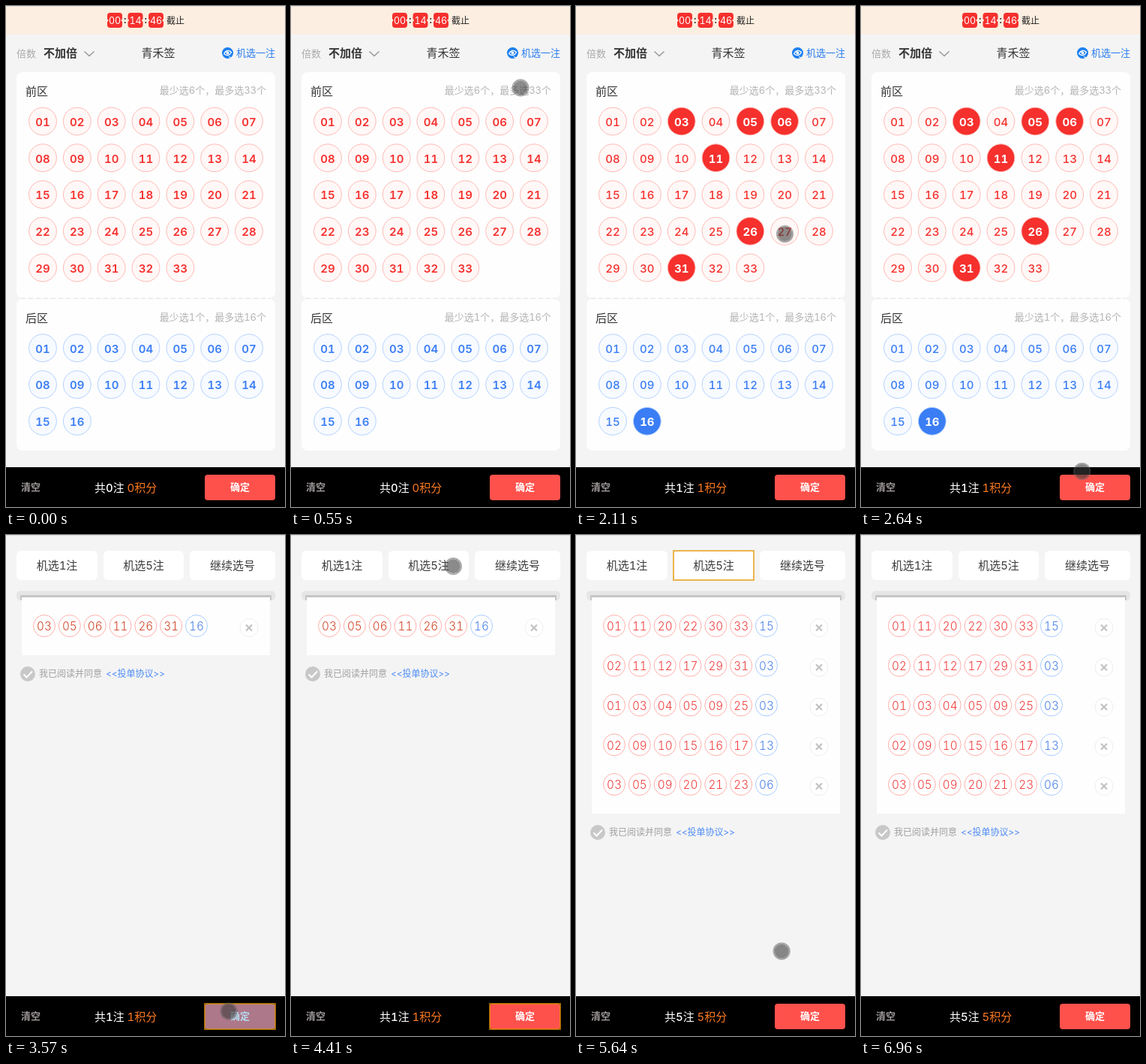
An HTML page for the animation above (7110 ms loop, 372x667 px).

```html
<!DOCTYPE html>
<html lang="zh-CN">
<head>
<meta charset="utf-8">
<style>
html, body { margin: 0; width: 100%; height: 100%; overflow: hidden; background: #f4f4f4; }
svg {
  display: block; width: 100%; height: 100%;
  font-family: Inter, "Noto Sans CJK SC", "Noto Sans CJK", sans-serif;
  font-variant-numeric: tabular-nums;
}
</style>
</head>
<body>
<svg viewBox="0 0 372 667" xmlns="http://www.w3.org/2000/svg">
  <g id="page"></g>
  <g id="cursor">
    <circle id="halo" r="10.6" stroke-width="2"/>
    <circle id="dot" r="9"/>
  </g>
</svg>
<script>
const LOOP = 7110, STEP = 76.7;
const CLICK_PICK = 1480, PICKED = 1630;
const CLICK_OK = 3485, LIST = 3560, TAP_END = 3640;
const CLICK_FIVE = 4870, FIVE = 5020, BLUR = 6960;
const ENTER = 170, LEAVE = 6100;
const RED = '#f5302d', BLUE = '#3a7df5', PAPER = '#fefefe', GREY = '#b4b4b4';

const first = ['03 05 06 11 26 31 16'];
const five = [
  '01 11 20 22 30 33 15',
  '02 11 12 17 29 31 03',
  '01 03 04 05 09 25 03',
  '02 09 10 15 16 17 13',
  '03 05 09 20 21 23 06'
];

const $ = id => document.getElementById(id);
const pad = n => String(n).padStart(2, '0');

function rect(x, y, w, h, fill, r = 0) {
  return `<rect x="${x}" y="${y}" width="${w}" height="${h}" rx="${r}" fill="${fill}"/>`;
}
function circle(x, y, r, fill, stroke = 'none') {
  return `<circle cx="${x}" cy="${y}" r="${r}" fill="${fill}" stroke="${stroke}"/>`;
}
function line(d, stroke, width, dash = 'none') {
  return `<path d="${d}" fill="none" stroke="${stroke}" stroke-width="${width}" stroke-dasharray="${dash}"/>`;
}
function focusRing(x, y, w, h) {
  return line(`M${x} ${y}h${w}v${h}h${-w}z`, 'rgba(229,151,0,.68)', 2);
}
// y is the middle of the glyphs
function text(s, x, y, size, fill, weight = 400, anchor = 'start') {
  const safe = s.replace(/</g, '&lt;').replace(/>/g, '&gt;');
  return `<text x="${x}" y="${y + size * 0.37}" font-size="${size}" fill="${fill}" font-weight="${weight}" text-anchor="${anchor}">${safe}</text>`;
}
const mid = (s, x, y, size, fill, weight) => text(s, x, y, size, fill, weight, 'middle');
const end = (s, x, y, size, fill) => text(s, x, y, size, fill, 400, 'end');

function balls(count, top, chosen, color, pale, edge, weight) {
  let out = '';
  for (let i = 0; i < count; i++) {
    const x = 49 + 45.83 * (i % 7), y = top + 48.75 * Math.floor(i / 7);
    const label = pad(i + 1), on = chosen.includes(label);
    out += circle(x, y, 18.4, on ? color : pale, edge);
    out += mid(label, x, y + 0.8, 15, on ? '#fff' : color, on ? 700 : weight);
  }
  return out;
}

function timer() {
  const back = '#fceee0';
  let out = rect(0, 0, 372, 38, back);
  ['00', '14', '46'].forEach((s, i) => {
    const x = 135 + 27.5 * i;
    out += rect(x, 9, 20, 20, RED, 4);
    out += circle(x, 19, 1.5, back) + circle(x + 20, 19, 1.5, back);
    out += mid(s, x + 10, 19.3, 12.5, '#fff');
    if (i < 2) out += mid(':', x + 23.8, 18.5, 13, '#222', 600);
  });
  return out + text('截止', 214, 19.3, 12, '#222', 500);
}

function randomIcon() {
  return circle(295.5, 62.5, 7.5, '#1a7ff0') +
    line('M290.5 63.5Q295 56.5 300.5 61.5Q297 68.5 290.5 63.5', '#fff', 1.3) +
    circle(295.5, 62.5, 1.9, '#fff') +
    line('M297 67.5L301.5 69.5', '#f4f4f4', 1.3);
}

function card(title, hint, y, h) {
  return rect(14, y, 345, h, PAPER, 8) +
    text(title, 26, y + 25.5, 15, '#333') +
    end(hint, 347, y + 24.5, 13, GREY);
}

function pickPage(picked) {
  const weight = picked ? 500 : 600;
  const chosen = picked ? first[0].split(' ') : [];
  return timer() +
    text('倍数', 14, 63, 13, '#aaa') +
    text('不加倍', 50, 62.5, 15, '#333', 700) +
    line('M104.5 60.5L111 66.5L117.5 60.5', '#999', 1.5) +
    mid('青禾签', 203, 62.5, 15, '#333') +
    randomIcon() +
    end('机选一注', 359, 62, 13, '#2a7df0') +
    card('前区', '最少选6个，最多选33个', 88, 301) +
    card('后区', '最少选1个，最多选16个', 390, 202) +
    line('M20 389.2H353', '#e6e6e6', 1.2, '6 4') +
    balls(33, 153.5, chosen.slice(0, 6), RED, '#fff8f7', '#ffb9b5', weight) +
    balls(16, 455.3, chosen.slice(6), BLUE, '#f7faff', '#b5d2ff', weight);
}

function tab(s, x, w) {
  return rect(x, 21, w, 39, '#fff', 6) + mid(s, x + w / 2, 40.3, 15, '#3c3a3a');
}

function ticket(row, j, ink) {
  const y = 121 + 52.75 * j, ky = y + 2.5;
  const numbers = row.split(' ').map((s, i) => {
    const x = 51 + 33.83 * i, last = i === 6;
    return circle(x, y, 14.5, '#fff', last ? '#a9cbff' : '#ffb0ac') +
      mid(s, x, y + 0.6, 15.3, last ? '#4a80e8' : ink, 300);
  });
  return numbers.join('') + circle(324, ky, 12, '#fff', '#eee') +
    line(`M320 ${ky - 4}l8 8m0 -8l-8 8`, '#c2c2c2', 2.2);
}

function listPage(rows) {
  const many = rows.length > 1;
  const bottom = 107.25 + 52.75 * rows.length, y = bottom + 25;
  return tab('机选1注', 14, 108) + tab('机选5注', 130, 107) + tab('继续选号', 245, 114) +
    rect(14, 74.5, 345, 12.5, '#e6e6e6', 5) +
    rect(19, 80, 335, 7, '#c6c6c6', 1) +
    rect(21, 83, 331, bottom - 83, PAPER) +
    rows.map((row, j) => ticket(row, j, many ? '#f03c3c' : '#d04628')).join('') +
    circle(29, y, 10, '#c8c8c8') +
    line(`M23.5 ${y + 0.5}l4 4l7.5 -8`, '#fff', 2) +
    text('我已阅读并同意', 44, y, 12, '#a0a0a0') +
    text('<<投单协议>>', 133, y, 12, '#4c8bf5');
}

function bar(count, tapped) {
  return rect(0, 614, 372, 53, '#000') +
    text('清空', 20, 640.3, 13, '#a09a9a', 700) +
    text(`共${count}注`, 118, 641.3, 15, '#fff', 500) +
    text(`${count}积分`, 161.5, 641.3, 15, '#ff7a22') +
    rect(265, 624, 94, 34, tapped ? '#ad7889' : '#ff514c', 4) +
    mid('确定', 312, 640.3, 13, tapped ? '#b5dcf0' : '#fff', 700);
}

const within = (t, a, b) => t >= a && t < b;

function draw(t) {
  const count = t < PICKED ? 0 : t < FIVE ? 1 : 5;
  let out = rect(0, 0, 372, 667, '#f4f4f4');
  out += t >= LIST ? listPage(count === 5 ? five : first) : pickPage(count > 0);
  out += rect(0, 0, 372, 1, '#dfdfdf') + bar(count, within(t, CLICK_OK, TAP_END));
  if (within(t, CLICK_OK, CLICK_FIVE)) out += focusRing(265, 624, 94, 34);
  if (within(t, CLICK_FIVE, BLUR)) out += focusRing(130, 21, 107, 39);
  return out;
}

// Each glide starts where the last one ended; bend bows it sideways.
const glides = [
  { from: 170, to: 780, x: 307, y: 62.5, power: 2.5 },
  { from: 1800, to: 1800, x: 309, y: 61, power: 1 },
  { from: 2030, to: 3030, x: 297, y: 634, power: 3.57, bendX: -26 },
  { from: 3720, to: 4180, x: 264, y: 108, power: 1.4 },
  { from: 4260, to: 4640, x: 199, y: 42, power: 1.9, bendY: -23 },
  { from: 5340, to: 6030, x: 311.5, y: 659.5, power: 2.55, bendX: -32 }
];

// The pointer moves in even steps with an ease-out.
function pointer(t) {
  let x = 292, y = 785;
  for (const g of glides) {
    if (t < g.from) break;
    const steps = Math.round((g.to - g.from) / STEP) + 1;
    const step = Math.floor((t - g.from) / STEP + 0.1) + 1;
    const e = 1 - (1 - Math.min(1, step / steps)) ** g.power;
    const bow = 4 * e * (1 - e);
    x += (g.x - x) * e + (g.bendX || 0) * bow;
    y += (g.y - y) * e + (g.bendY || 0) * bow;
  }
  return [x, y];
}

function drawCursor(t) {
  const [x, y] = pointer(t);
  const down = within(t, CLICK_PICK, PICKED) || within(t, CLICK_OK, LIST) || within(t, CLICK_FIVE, FIVE);
  $('cursor').setAttribute('transform', `translate(${x} ${y})`);
  $('cursor').setAttribute('visibility', within(t, ENTER, LEAVE) ? 'visible' : 'hidden');
  $('halo').setAttribute('fill', down ? 'rgba(215,205,40,.72)' : 'rgba(60,60,60,.14)');
  $('halo').setAttribute('stroke', down ? 'rgba(225,215,70,.7)' : 'rgba(100,100,100,.5)');
  $('dot').setAttribute('r', down ? 7 : 9.4);
  $('dot').setAttribute('fill', down ? 'rgba(125,120,40,.55)' : 'rgba(60,60,60,.53)');
}

const marks = [PICKED, CLICK_OK, LIST, TAP_END, CLICK_FIVE, FIVE, BLUR];
let shown = -1;

function update(t) {
  const stage = marks.filter(m => m <= t).length;
  if (stage !== shown) {
    $('page').innerHTML = draw(t);
    shown = stage;
  }
  drawCursor(t);
}

const origin = performance.now();
function tick() {
  update((performance.now() - origin) % LOOP);
  requestAnimationFrame(tick);
}
tick();
</script>
</body>
</html>
```
